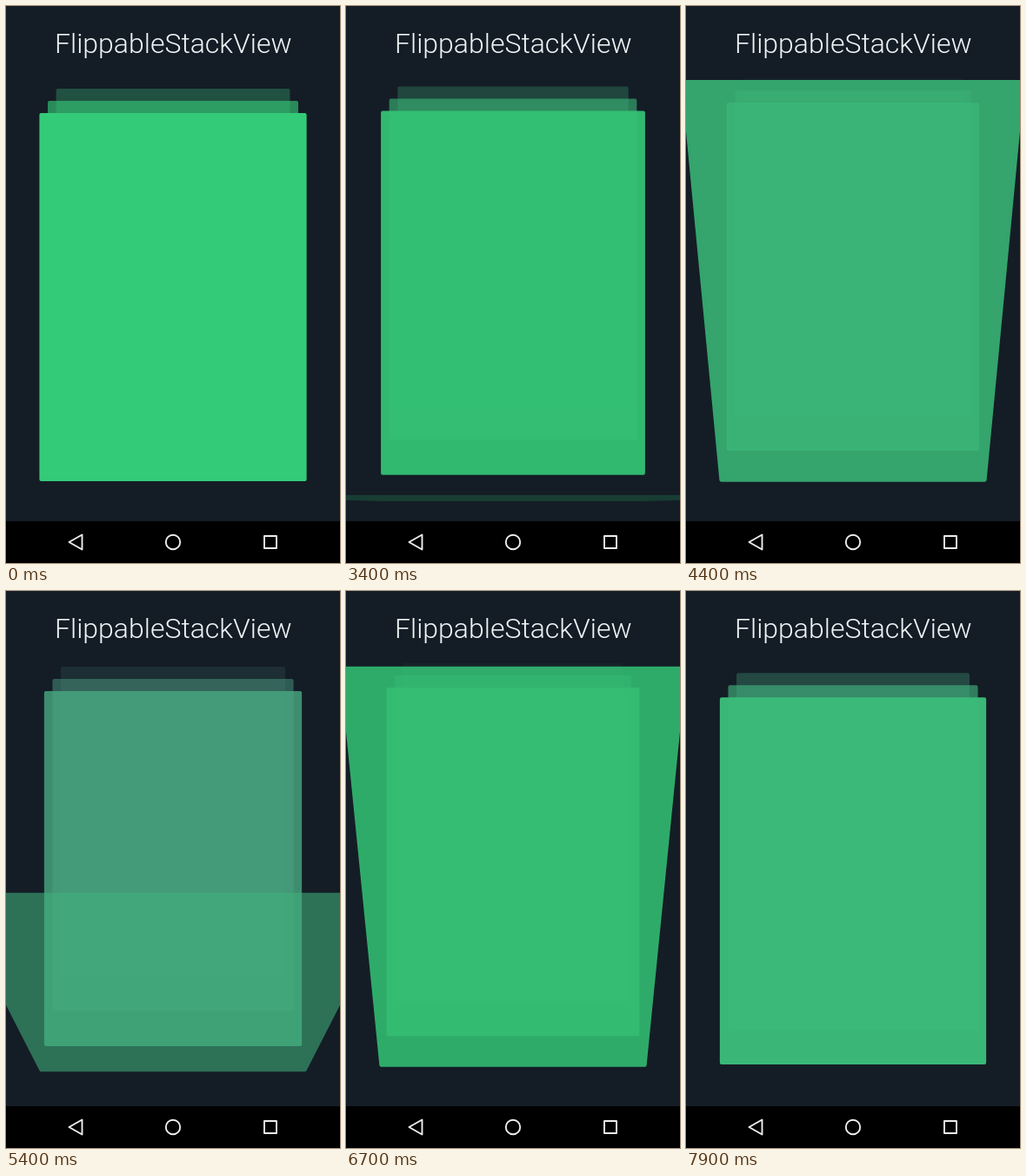
An HTML page for the animation above (8000 ms loop, 384 by 640 pixels).

```html
<!DOCTYPE html>
<html lang="en">
<head>
<meta charset="utf-8">
<title>FlippableStackView</title>
<style>
html, body { margin: 0; width: 100%; height: 100%; overflow: hidden; background: #141d26; }
svg { display: block; width: 100%; height: 100%; }
text { font: 300 32px Roboto, sans-serif; fill: #f0f4f6; }
#cards polygon { stroke-width: 4; stroke-linejoin: round; }
#nav { fill: none; stroke: #eee; stroke-width: 1.9; stroke-linejoin: round; }
</style>
</head>
<body>
<svg viewBox="0 0 384 640">
  <rect width="384" height="640" fill="#141d26"/>
  <text x="192.3" y="54" text-anchor="middle">FlippableStackView</text>
  <g id="cards"></g>
  <rect y="592" width="384" height="48" fill="#000"/>
  <g id="nav">
    <path d="M72.5 616 L87.5 607.5 V624.5 Z"/>
    <circle cx="192" cy="616" r="8.2"/>
    <rect x="297" y="609" width="14" height="14"/>
  </g>
</svg>
<script>
const LOOP = 8000, COUNT = 8, CX = 192, TOP = 123, BOTTOM = 546;
const HEIGHT = BOTTOM - TOP, PERSPECTIVE = 0.42, INSET = 2;
const FIRST = [46, 204, 113], LAST = [142, 68, 173];

// time in ms, scroll position in cards
const KEYS = [
  [0, 0], [2650, 0], [3400, 0.82], [4400, 2.136], [5400, 3.43],
  [5520, 3.5], [6700, 1.145], [6850, 1], [7900, 1.95], [8000, 1.98]
];

const group = document.getElementById("cards");
const cards = Array.from({ length: COUNT }, (_, i) => {
  const el = document.createElementNS("http://www.w3.org/2000/svg", "polygon");
  group.prepend(el);
  paint(el, FIRST.map((c, k) => Math.round(c + (LAST[k] - c) * i / 15)));
  return el;
});

function paint(el, rgb) {
  const color = `rgb(${rgb})`;
  el.setAttribute("fill", color);
  el.setAttribute("stroke", color);
}

function slope(i) {
  const a = KEYS[i - 1], b = KEYS[i], c = KEYS[i + 1];
  if (!a || !c || (b[1] - a[1]) * (c[1] - b[1]) <= 0) return 0;
  return (c[1] - a[1]) / (c[0] - a[0]);
}

function scroll(t) {
  let i = 0;
  while (i < KEYS.length - 2 && t >= KEYS[i + 1][0]) i++;
  const [t0, p0] = KEYS[i], [t1, p1] = KEYS[i + 1];
  const d = t1 - t0, u = (t - t0) / d, v = 1 - u;
  return v * v * (1 + 2 * u) * p0 + u * u * (3 - 2 * u) * p1
    + d * u * v * (v * slope(i) - u * slope(i + 1));
}

function quad(el, top, bottom, halfTop, halfBottom, alpha) {
  const a = halfTop - INSET, b = halfBottom - INSET;
  const y0 = top + INSET, y1 = Math.max(y0, bottom - INSET);
  el.setAttribute("points", `${CX - a},${y0} ${CX + a},${y0} ${CX + b},${y1} ${CX - b},${y1}`);
  el.setAttribute("opacity", Math.max(0, alpha));
}

function place(el, depth) {
  if (depth >= 0) {
    const scale = 0.8 - 0.05 * depth, top = TOP - 14 * depth;
    quad(el, top, top + HEIGHT * scale / 0.8, CX * scale, CX * scale, 1 - depth / 3);
    return;
  }
  // the front card tips towards the viewer about its lower edge
  const p = Math.min(1, -depth);
  const angle = Math.PI / 2 * (1 - (1 - p) ** 2.965);
  const zoom = 1 / (1 - PERSPECTIVE * Math.sin(angle));
  const bottom = BOTTOM + 34 * p * p, half = CX * 0.8;
  const tall = HEIGHT * Math.cos(angle) * zoom;
  quad(el, bottom - tall, bottom, half * zoom, half, tall > 4 ? 1 - p : 0);
}

function draw(t) {
  const pos = scroll(t);
  cards.forEach((el, i) => place(el, i - pos));
  paint(cards[0], t < 1800 ? [51, 203, 120] : FIRST);
}

function tick(now) {
  draw(now % LOOP);
  requestAnimationFrame(tick);
}
draw(0);
requestAnimationFrame(tick);
</script>
</body>
</html>
```
